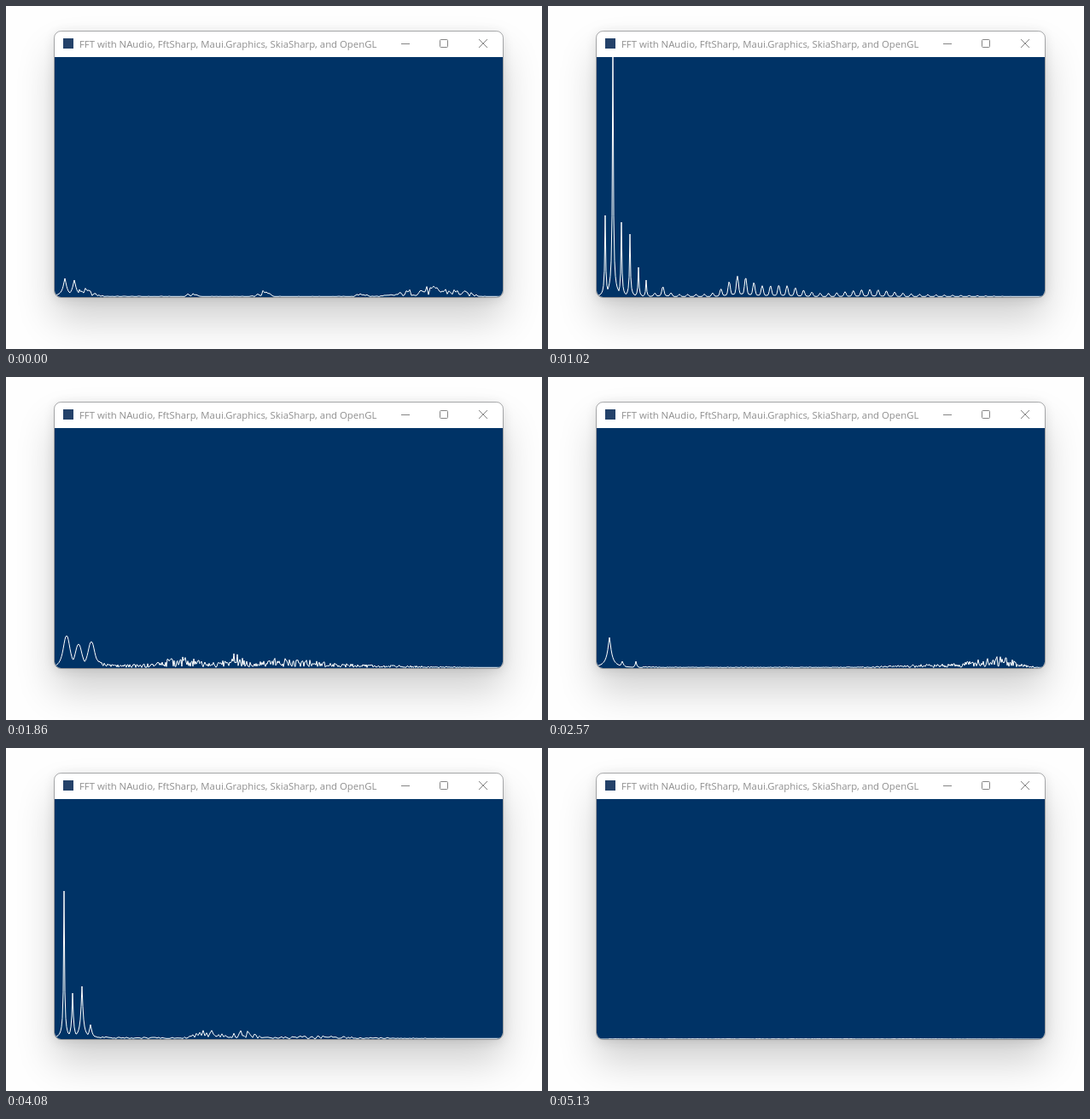
These frames come from a looping animation (628x403 px, 5.2 s). An HTML page:

```html
<!DOCTYPE html>
<html lang="en">
<head>
<meta charset="utf-8">
<title>Spectrum</title>
<style>
  html, body { margin: 0; width: 100%; height: 100%; overflow: hidden; background: #fefefe; }
  .shadow {
    position: absolute; left: 57px; top: 30px; width: 525px; height: 312px; border-radius: 8px;
    box-shadow: 0 26px 46px rgba(0, 0, 0, .19), 0 2px 14px rgba(0, 0, 0, .12);
  }
  svg { position: absolute; left: 0; top: 0; display: block; }
  text { font: 11.36px "Open Sans", "Noto Sans", sans-serif; fill: #8e8e8e; }
</style>
</head>
<body>
<div class="shadow"></div>
<svg width="628" height="403" viewBox="0 0 628 403">
  <defs>
    <clipPath id="frame"><rect x="57" y="30" width="525" height="312" rx="7.5"/></clipPath>
  </defs>
  <g clip-path="url(#frame)">
    <rect x="57" y="30" width="525" height="312" fill="#fff"/>
    <svg x="57" y="60" width="525" height="282">
      <rect width="525" height="282" fill="#003366"/>
      <path id="trace" fill="none" stroke="#fff"/>
    </svg>
  </g>
  <rect x="56.5" y="29.5" width="526" height="313" rx="8" fill="none" stroke="#404448" stroke-opacity=".42"/>
  <rect x="67" y="38" width="12" height="12" fill="#24426a"/>
  <text x="86" y="49">FFT with NAudio, FftSharp, Maui.Graphics, SkiaSharp, and OpenGL</text>
  <g fill="none" stroke="#858585">
    <path d="M463 44.5H473"/>
    <rect x="508.5" y="39.5" width="9" height="9" rx="1"/>
    <path d="M554 39L564 49M564 39L554 49"/>
  </g>
</svg>
<script>
const LOOP = 5200, STEP = 70, BINS = 526, FLOOR = 282, SILENCE = 4990;

// Each burst is eight steps; its loudest step sets the peak and the rest decay from it.
const bursts = [
  { start: 60, loud: 3, peak: 241 }, { start: 600, loud: 6, peak: 300 },
  { start: 1160, loud: 0, peak: 290 }, { start: 1720, loud: 4, peak: 157 },
  { start: 2280, loud: 5, peak: 183 }, { start: 2820, loud: 3, peak: 189 },
  { start: 3390, loud: 0, peak: 188 }, { start: 3940, loud: 0, peak: 262 },
  { start: 4500, loud: 0, peak: 154 }, { start: 5060, loud: 0, peak: 0 }
];

// Key sounds: harmonics of a pitch (in bins), then noise gathered in bumps [bin, height, width].
const sounds = [
  { at: 0, pitch: 11.5, harmonics: [22, 20], width: 2.5, hiss: 1, grain: 2,
    bumps: [[35, 8, 9], [161, 6, 4], [246, 7, 6], [360, 7, 4], [432, 11, 22], [470, 7, 20]] },
  { at: 1020, pitch: 9.7, harmonics: [96, 300, 88, 74, 35, 20], width: .6, hiss: 3, comb: true,
    bumps: [[78, 9, 5], [167, 21, 14], [215, 11, 22], [319, 6, 25]] },
  { at: 1860, pitch: 14.2, harmonics: [38, 28, 31], width: 4.7, slope: 2.4, hiss: 4,
    bumps: [[148, 9, 20], [210, 14, 7], [265, 8, 40]] },
  { at: 2560, pitch: 15.2, harmonics: [36, 8, 8], width: 2.6, spread: -.8, hiss: 1.2,
    bumps: [[410, 4, 50], [468, 12, 22]] },
  { at: 3390, pitch: 11.1, harmonics: [188, 138, 82, 150], width: .6, spread: .6, hiss: 5,
    bumps: [[55, 5, 10], [162, 29, 8], [248, 25, 5], [358, 6, 25]] },
  { at: 4080, pitch: 10.6, harmonics: [174, 54, 62, 17], width: .6, spread: .4, hiss: 2, grain: 2,
    bumps: [[181, 12, 12], [222, 9, 10], [307, 2, 30]] },
  { at: SILENCE, pitch: 10, harmonics: [0], width: 1, hiss: .4, bumps: [] }
];

const mix = (a, b, k) => a + (b - a) * k;

function random(n, seed) {
  const s = Math.sin(n * 12.9898 + seed * 78.233) * 43758.5453;
  return s - Math.floor(s);
}

function tone({ pitch, harmonics, width, spread = 0, slope = 1.5 }, bin) {
  return Math.max(...harmonics.map((height, n) => {
    const distance = Math.abs(bin - Math.round((n + 1) * pitch));
    return height / (1 + (distance / (width + spread * n)) ** slope);
  }));
}

function texture({ pitch, comb, grain = 1 }, bin, seed) {
  if (comb) return .15 + .85 * Math.abs(Math.cos(Math.PI * bin / pitch)) ** 6;
  const cell = Math.floor(bin / grain);
  return .12 + .88 * mix(random(cell, seed), random(cell + 1, seed), bin / grain - cell);
}

function noise(sound, bin, seed) {
  if (bin < sound.pitch * (sound.harmonics.length + .5)) return 0;
  const fade = Math.min(1, (BINS - bin) / 150);
  const level = sound.bumps.reduce((sum, [center, height, width]) =>
    sum + height * Math.exp(-(((bin - center) / width) ** 2) / 2), sound.hiss * fade);
  return level * texture(sound, bin, seed);
}

function tracePath(at, peak, seed) {
  const b = sounds.find(s => s.at >= at) || sounds.at(-1);
  const a = sounds.findLast(s => s.at <= at);
  const k = a === b ? 0 : (at - a.at) / (b.at - a.at);
  const blend = layer => Array.from({ length: BINS }, (_, bin) =>
    mix(layer(a, bin, seed), layer(b, bin, seed), k));
  const tones = blend(tone), hiss = blend(noise);
  const gain = a === b ? 1 : peak / Math.max(...tones);
  const base = at < SILENCE ? .7 : 0;
  return "M" + tones.map((height, bin) =>
    bin + " " + (FLOOR - Math.max(base, height * gain + hiss[bin])).toFixed(2)).join("L");
}

const steps = [{ at: 0, path: tracePath(0, 0, 1) }];
for (const { start, loud, peak } of bursts) {
  for (let i = 0; i < 8; i++) {
    const at = start + i * STEP;
    const decay = Math.exp(-.45 * ((i - loud + 8) % 8));
    steps.push({ at, path: tracePath(at, peak * decay, steps.length + 1) });
  }
}

const trace = document.getElementById("trace");
let shown;

function draw() {
  const t = performance.now() % LOOP;
  const step = steps.findLast(s => s.at <= t);
  if (step !== shown) trace.setAttribute("d", step.path);
  shown = step;
  requestAnimationFrame(draw);
}
draw();
</script>
</body>
</html>
```
